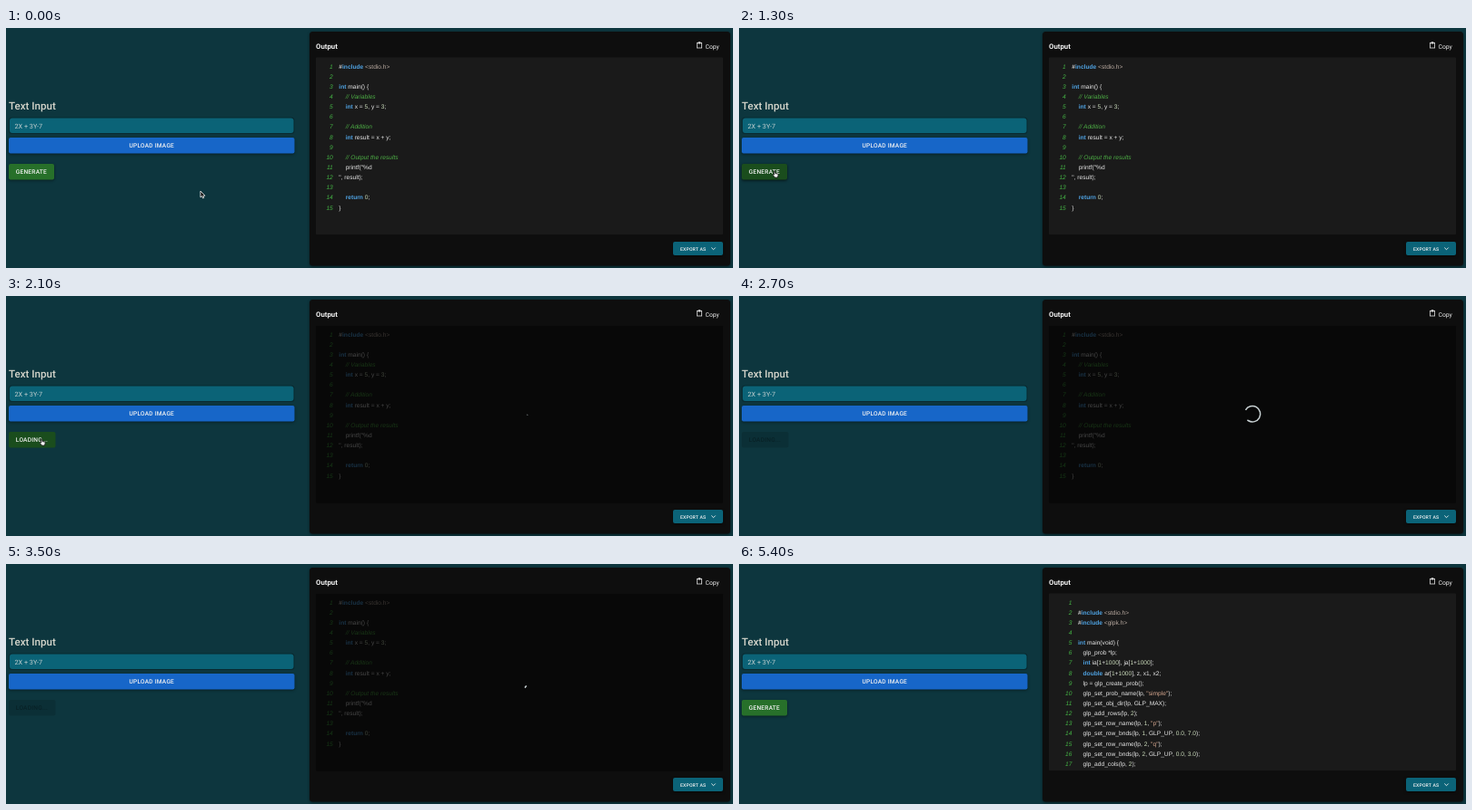
Recreate the animation shown at these times as an HTML page with a canvas. Size 800 by 265 pixels, loop 5.5 s.

```html
<!DOCTYPE html>
<html lang="en">
<head>
<meta charset="utf-8">
<title>Code generator</title>
<style>
html, body { margin: 0; width: 100%; height: 100%; overflow: hidden; background: #0d363e; }
canvas { display: block; width: 800px; height: 265px; }
</style>
</head>
<body>
<canvas id="stage"></canvas>
<script>
const canvas = document.getElementById('stage');
const ctx = canvas.getContext('2d');
const ratio = window.devicePixelRatio || 1;
canvas.width = 800 * ratio;
canvas.height = 265 * ratio;

const LOOP = 5500;
const HOVER = 800, LOADING = 2050, CURSOR_GONE = 2400, READY = 3800;
const UI = 'Roboto, sans-serif';
const CODE = '"Liberation Sans", Arial, sans-serif';
const CODE_SIZE = 6.65, LINE_HEIGHT = 11.15;
const GREEN = [39, 112, 42, 1], DARK_GREEN = [26, 77, 29, 1], DISABLED = [0, 0, 0, 0.13];

const sample = `#include <stdio.h>

int main() {
    // Variables
    int x = 5, y = 3;

    // Addition
    int result = x + y;

    // Output the results
    printf("%d
", result);

    return 0;
}`.split('\n');

const solution = `
#include <stdio.h>
#include <glpk.h>

int main(void) {
   glp_prob *lp;
   int ia[1+1000], ja[1+1000];
   double ar[1+1000], z, x1, x2;
   lp = glp_create_prob();
   glp_set_prob_name(lp, "simple");
   glp_set_obj_dir(lp, GLP_MAX);
   glp_add_rows(lp, 2);
   glp_set_row_name(lp, 1, "p");
   glp_set_row_bnds(lp, 1, GLP_UP, 0.0, 7.0);
   glp_set_row_name(lp, 2, "q");
   glp_set_row_bnds(lp, 2, GLP_UP, 0.0, 3.0);
   glp_add_cols(lp, 2);`.split('\n');

const clamp = v => Math.max(0, Math.min(1, v));
const smooth = v => { v = clamp(v); return v * v * (3 - 2 * v); };
const mix = (a, b, p) => a + (b - a) * p;
const mixColor = (a, b, p) => `rgba(${a.map((v, i) => mix(v, b[i], p)).join(',')})`;

function box(x, y, w, h, r, fill, shadow = 0) {
  ctx.save();
  if (shadow) {
    ctx.shadowColor = `rgba(0,0,0,${shadow})`;
    ctx.shadowBlur = 3 * ratio;
    ctx.shadowOffsetY = ratio;
  }
  ctx.fillStyle = fill;
  ctx.beginPath();
  ctx.roundRect(x, y, w, h, r);
  ctx.fill();
  ctx.restore();
}

function text(str, x, y, size, weight, color, spacing = 0) {
  ctx.font = `${weight} ${size}px ${UI}`;
  ctx.letterSpacing = spacing + 'px';
  ctx.fillStyle = color;
  ctx.fillText(str, x, y);
  ctx.letterSpacing = '0px';
}

const tokenPattern = /\/\/.*|#|<[\w.]+>|"\w+"|\b(?:include|int|double|return)\b|\b\d[\d.]*|\s+|\w+|./g;

function tokenStyle(token) {
  if (token.startsWith('//')) return ['italic', '#4dad45'];
  if (/^(include|int|double|return)$/.test(token)) return ['bold', '#4fa3e3'];
  if (token === '#') return ['bold', '#d0d0d0'];
  if (/^<\w/.test(token)) return ['normal', '#b9aaa0'];
  if (/^"\w/.test(token)) return ['normal', '#d6a78f'];
  if (/^\d/.test(token)) return ['normal', '#cbdcbb'];
  return ['normal', '#e8e8e8'];
}

function drawCode(lines, left) {
  ctx.save();
  ctx.beginPath();
  ctx.rect(341, 32.5, 448, 195.5);
  ctx.clip();
  lines.forEach((line, i) => {
    const y = 44.5 + i * LINE_HEIGHT;
    ctx.font = `italic ${CODE_SIZE}px ${CODE}`;
    ctx.fillStyle = '#45b545';
    ctx.textAlign = 'right';
    ctx.fillText(i + 1, left - 6.5, y);
    ctx.textAlign = 'left';
    let x = left;
    for (const token of line.match(tokenPattern) || []) {
      const [style, color] = tokenStyle(token);
      ctx.font = `${style} ${CODE_SIZE}px ${CODE}`;
      ctx.fillStyle = color;
      ctx.fillText(token, x, y);
      x += ctx.measureText(token).width;
    }
  });
  ctx.restore();
}

// Indeterminate ring: the dash grows, then shrinks while the ring turns.
function drawSpinner(elapsed) {
  const p = (elapsed / 1320) % 1;
  const first = smooth(p * 2), second = smooth(p * 2 - 1);
  const start = p < 0.5 ? 15 * first : mix(15, 125, second);
  const length = p < 0.5 ? mix(1, 100, first) : 100;
  const radius = 8.7, turn = p * Math.PI * 2, unit = 1 / 20.2;
  ctx.strokeStyle = '#c9d2d4';
  ctx.lineWidth = 1.5;
  ctx.beginPath();
  ctx.arc(565, 130.2, radius, turn + start * unit, turn + Math.min(start + length, 126.9) * unit);
  ctx.stroke();
}

function drawOutput(t) {
  const loading = t >= LOADING && t < READY;
  box(334, 4, 463, 258.5, 3.5, '#0e0e0e', 0.5);
  text('Output', 341, 23, 7.8, 700, '#f2f2f2');

  ctx.strokeStyle = '#dedede';
  ctx.lineWidth = 0.8;
  ctx.strokeRect(760.4, 16.4, 5.2, 5.6);
  box(761.6, 15.2, 2.8, 2.2, 0.5, '#dedede');
  text('Copy', 769.5, 22.6, 6.8, 400, '#eeeeee');

  box(341, 32.5, 448, 195.5, 1, '#1a1a1a');
  if (t < READY) drawCode(sample, 366.3);
  else drawCode(solution, 373);
  if (loading) {
    box(341, 32.5, 448, 196, 1, 'rgba(0,0,0,0.7)');
    drawSpinner(t - LOADING - 35);
  }

  box(734, 236, 55, 15, 2, '#0b6378', 0.5);
  text('EXPORT AS', 742, 245.5, 5.15, 500, '#f2f2f2', 0.15);
  ctx.strokeStyle = '#f2f2f2';
  ctx.lineWidth = 0.9;
  ctx.beginPath();
  ctx.moveTo(776.3, 242.5);
  ctx.lineTo(778.5, 244.7);
  ctx.lineTo(780.7, 242.5);
  ctx.stroke();
}

function drawGenerate(t) {
  const loading = t >= LOADING && t < READY;
  let fill, shadow = 0.45, label = '#f2f2f2';
  if (t < LOADING) {
    const p = smooth((t - HOVER) / 250);
    fill = mixColor(GREEN, DARK_GREEN, p);
    shadow = mix(0.45, 0.65, p);
  } else if (loading) {
    const p = smooth((t - LOADING - 50) / 250);
    fill = mixColor(DARK_GREEN, DISABLED, p);
    label = mixColor([242, 242, 242, 1], [0, 0, 0, 0.3], p);
    shadow = p > 0 ? 0 : 0.65;
  } else {
    fill = mixColor(DISABLED, GREEN, smooth((t - READY) / 250));
  }
  box(3, 150, loading ? 51.5 : 50, 17.5, 2, fill, shadow);
  text(loading ? 'LOADING...' : 'GENERATE', 10.8, 161, 6.65, 500, label, 0.19);
}

function drawForm(t) {
  text('Text Input', 3, 90, 11.6, 500, '#d6d6cc');
  box(3, 98.5, 314.5, 18.5, 3.5, '#092a31');
  box(4, 99.5, 312.5, 16.5, 3, '#0b6377');
  text('2X + 3Y-7', 9.5, 110.5, 7.25, 400, '#c3d0d0');
  box(3, 121, 314.5, 17.5, 2, '#1766c8', 0.45);
  text('UPLOAD IMAGE', 135.5, 132.2, 6.65, 500, '#f2f2f2', 0.19);
  drawGenerate(t);
}

function drawPointer(x, y, outline, fill, stroke) {
  ctx.save();
  ctx.translate(x, y);
  ctx.lineJoin = 'round';
  ctx.lineWidth = 0.9;
  ctx.fillStyle = fill;
  ctx.strokeStyle = stroke;
  const path = new Path2D(outline);
  ctx.fill(path);
  ctx.stroke(path);
  ctx.restore();
}

function drawCursor(t) {
  if (t >= CURSOR_GONE) return;
  if (t < HOVER) {
    const p = smooth((t - 50) / 650);
    const x = mix(214, 52.5, p) - 6 * smooth((t - 700) / 200);
    drawPointer(x, mix(180, 157.8, p),
      'M0 0V7L1.6 5.6L2.7 8L3.8 7.5L2.8 5.2H5Z', '#080808', '#e4e4e4');
  } else {
    const x = mix(48, 38, smooth((t - HOVER) / 200));
    drawPointer(x, 157.5,
      'M0.5 0.6Q1.2 0 1.6 0.8L2 3L4.6 3.6Q5.4 4 5.1 5.2L4.5 7.6H1.5L-0.8 4.8Q-0.8 3.8 0.8 4.5Z',
      '#f4f4f4', '#222222');
  }
}

function render() {
  const t = performance.now() % LOOP;
  ctx.setTransform(ratio, 0, 0, ratio, 0, 0);
  ctx.textRendering = 'geometricPrecision';
  ctx.fillStyle = '#0d363e';
  ctx.fillRect(0, 0, 800, 265);
  drawForm(t);
  drawOutput(t);
  drawCursor(t);
  requestAnimationFrame(render);
}
render();
</script>
</body>
</html>
```
